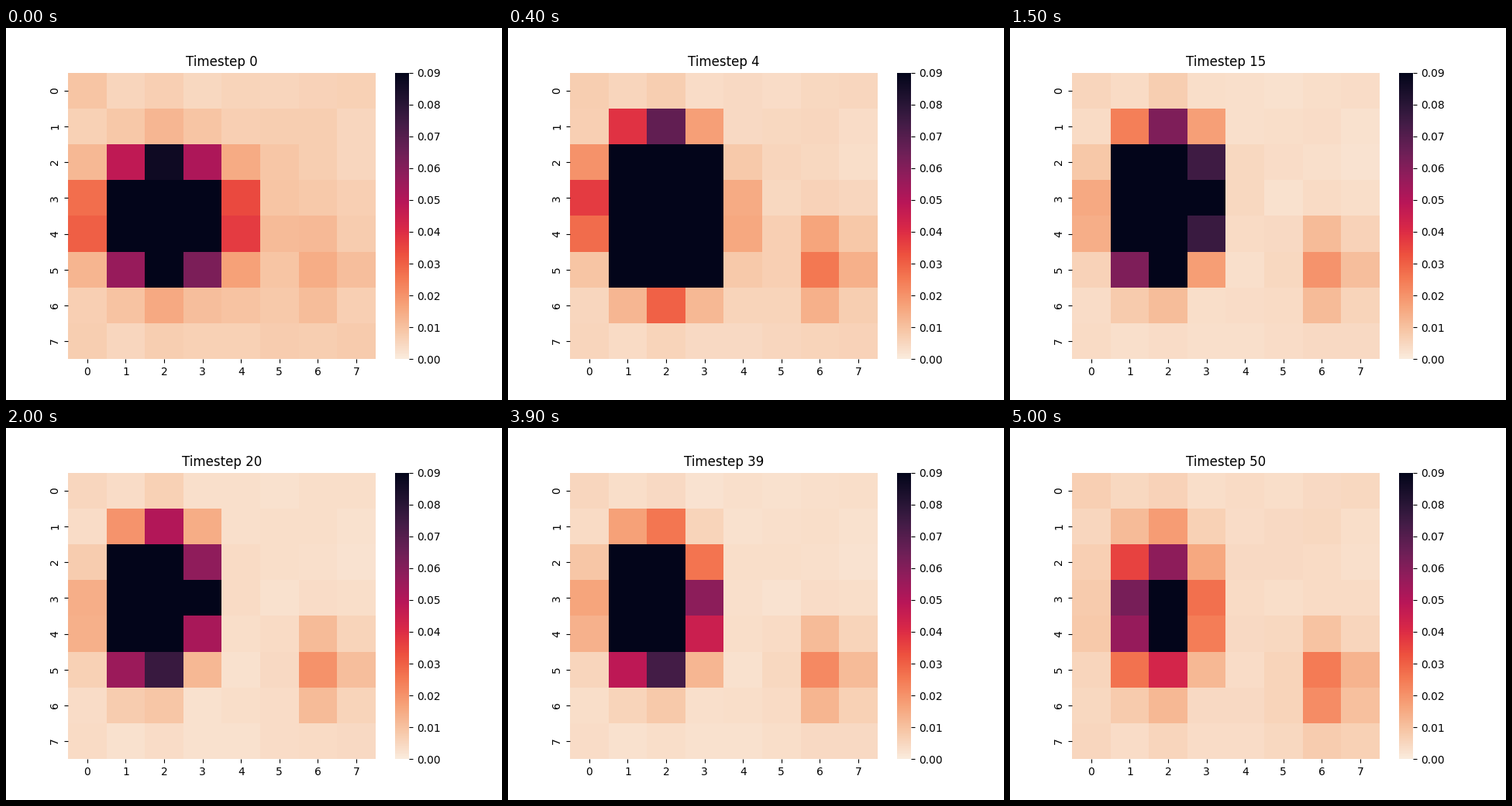
These frames come from a looping animation (640x480 px, 5.1 s). A matplotlib script:

```python
import numpy as np
import matplotlib.pyplot as plt
from matplotlib.animation import FuncAnimation
from matplotlib.colors import LinearSegmentedColormap

STEPS = 51
SIZE = 8
VMAX = 90  # levels are in thousandths

# Pale cream through red and purple to near black
TWELFTHS = ["#faebdd", "#f7c9aa", "#f6a47b", "#f47c56", "#ed513e", "#d92847",
            "#b91657", "#921c5b", "#6a1f56", "#451c47", "#221331", "#03051a"]
SEVENTHS = ["#f6b48f", "#f37651", "#e13342", "#ad1759", "#701f57", "#35193e"]
stops = [(i / 11, c) for i, c in enumerate(TWELFTHS)]
stops += [(i / 7, c) for i, c in enumerate(SEVENTHS, 1)]
cmap = LinearSegmentedColormap.from_list("ember", sorted(stops), N=256)

rows, cols = np.mgrid[:SIZE, :SIZE]
grain = np.random.default_rng(4).uniform(0.75, 1.25, (SIZE, SIZE))
grain[::SIZE - 1, ::SIZE - 1] *= 1.5  # warmer corners

# Key poses: step, peak, column, row, column and row tightness, tilt
BLOB = np.array([
    (0, 384, 2.03, 3.55, 1.3, 1.3, 0),
    (4, 1480, 1.88, 3.33, 2.15, 1.15, 0.1),
    (8, 944, 1.86, 3.2, 2.4, 1.1, 0.05),
    (18, 545, 1.79, 3.12, 2.4, 1.05, -0.2),
    (30, 469, 1.69, 3.25, 2.45, 1.15, 0),
    (42, 469, 1.69, 3.25, 2.45, 1.15, 0),
    (50, 115, 1.77, 3.35, 2.1, 0.75, 0),
])
SPOT = np.array([
    (0, 8, 6.2, 4.95, 3, 1.5, 0),
    (4, 23, 6.2, 4.9, 3, 1.5, 0),
    (8, 18, 6.2, 4.95, 3, 1.5, 0),
    (42, 21, 6.2, 5.05, 3, 1.5, 0),
    (50, 25, 6.2, 5.35, 3, 1.5, 0),
])


def bump(peak, col, row, tight_x, tight_y, tilt=0):
    dx, dy = cols - col, rows - row
    return peak * np.exp(tilt * dx * dy - (tight_x * dx**2 + tight_y * dy**2) / 2)


def pose(keys, step):
    return [np.interp(step, keys[:, 0], track) for track in keys[:, 1:].T]


def grid_at(step):
    ground = 2.7 + 2.3 * np.exp(-step / 6) + np.interp(step, [42, 50], [0, 1])
    halo = bump(5 * np.exp(-step / 3), 4, 4, 0.25, 0.25)
    hot = bump(*pose(BLOB, step)) + bump(*pose(SPOT, step))
    return ground * grain + halo + hot


fig, ax = plt.subplots(figsize=(6.4, 4.8), dpi=100)
mesh = ax.pcolormesh(grid_at(0), cmap=cmap, vmin=0, vmax=VMAX)
ax.set(xlim=(0, SIZE), ylim=(SIZE, 0))
centres = np.arange(SIZE) + 0.5
ax.set_xticks(centres, range(SIZE))
ax.set_yticks(centres, range(SIZE), rotation="vertical", va="center")
ax.spines[:].set_visible(False)
title = ax.set_title("Timestep 0")

bar = fig.colorbar(mesh, ax=ax, ticks=range(0, VMAX + 1, 10),
                   format=lambda level, _: f"{level / 1000:.2f}")
bar.outline.set_linewidth(0)


def update(step):
    mesh.set_array(grid_at(step))
    title.set_text(f"Timestep {step}")
    return mesh, title


anim = FuncAnimation(fig, update, frames=STEPS, interval=100,
                     repeat=True, repeat_delay=0)
plt.show()
```
